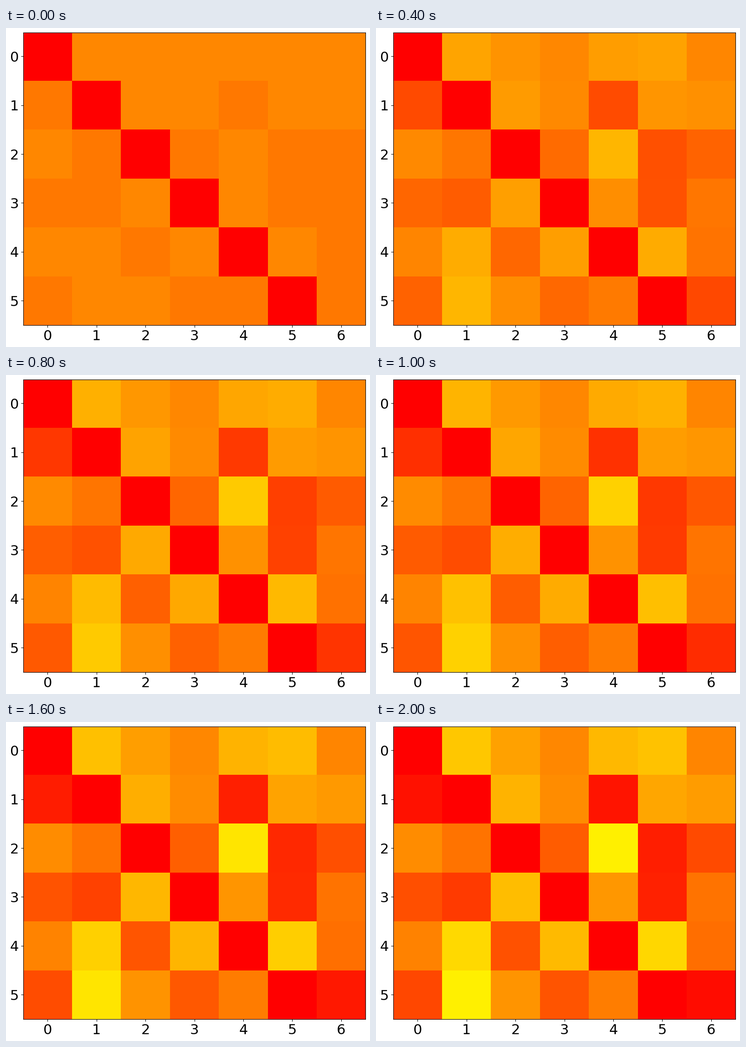
A matplotlib script that plays this animation: 799 by 701 pixels, repeating every 2.2 s.

```python
import matplotlib.pyplot as plt
import numpy as np
from matplotlib.animation import FuncAnimation

W, H, DPI = 799, 701, 100
STEPS, STEP_MS = 11, 200

# Axes box and cell size in pixels; the top row is cut slightly by the frame.
LEFT, TOP, BOTTOM, CELL = 37.75, 9.6, 652.9, 107.36

# Heat in percent that each cell drifts towards; the diagonal stays at zero.
GOAL = np.array([
    [0, 78, 63, 53, 72, 76, 52],
    [7, 0, 70, 55, 8, 65, 61],
    [55, 45, 0, 36, 94, 12, 29],
    [31, 23, 74, 0, 59, 13, 45],
    [51, 85, 32, 73, 0, 84, 43],
    [28, 94, 58, 33, 49, 0, 5],
])
ROWS, COLS = GOAL.shape
START = np.where(GOAL > 0, 50 + 3 * np.sign(GOAL - 50), 0)


def heat(step):
    """Fast drift at first that slows down as the square root of time."""
    return START + (GOAL - START) * np.sqrt(step / (STEPS - 1))


plt.rcParams.update({"font.family": "DejaVu Sans", "font.size": 22})
fig = plt.figure(figsize=(W / DPI, H / DPI), dpi=DPI, facecolor="white")
ax = fig.add_axes([LEFT / W, 1 - BOTTOM / H,
                   COLS * CELL / W, (BOTTOM - TOP) / H])
mesh = ax.pcolormesh(np.arange(COLS + 1) - 0.5, np.arange(ROWS + 1) - 0.5,
                     heat(0), cmap="autumn", vmin=0, vmax=100)
floor = ROWS - 0.5
ax.set_xlim(-0.5, COLS - 0.5)
ax.set_ylim(floor, floor - (BOTTOM - TOP) / CELL)
ax.set_xticks(range(COLS))
ax.set_yticks(range(ROWS))


def draw(step):
    mesh.set_array(heat(step))
    return [mesh]


anim = FuncAnimation(fig, draw, frames=STEPS, interval=STEP_MS,
                     repeat=True, repeat_delay=0)
plt.show()
```
